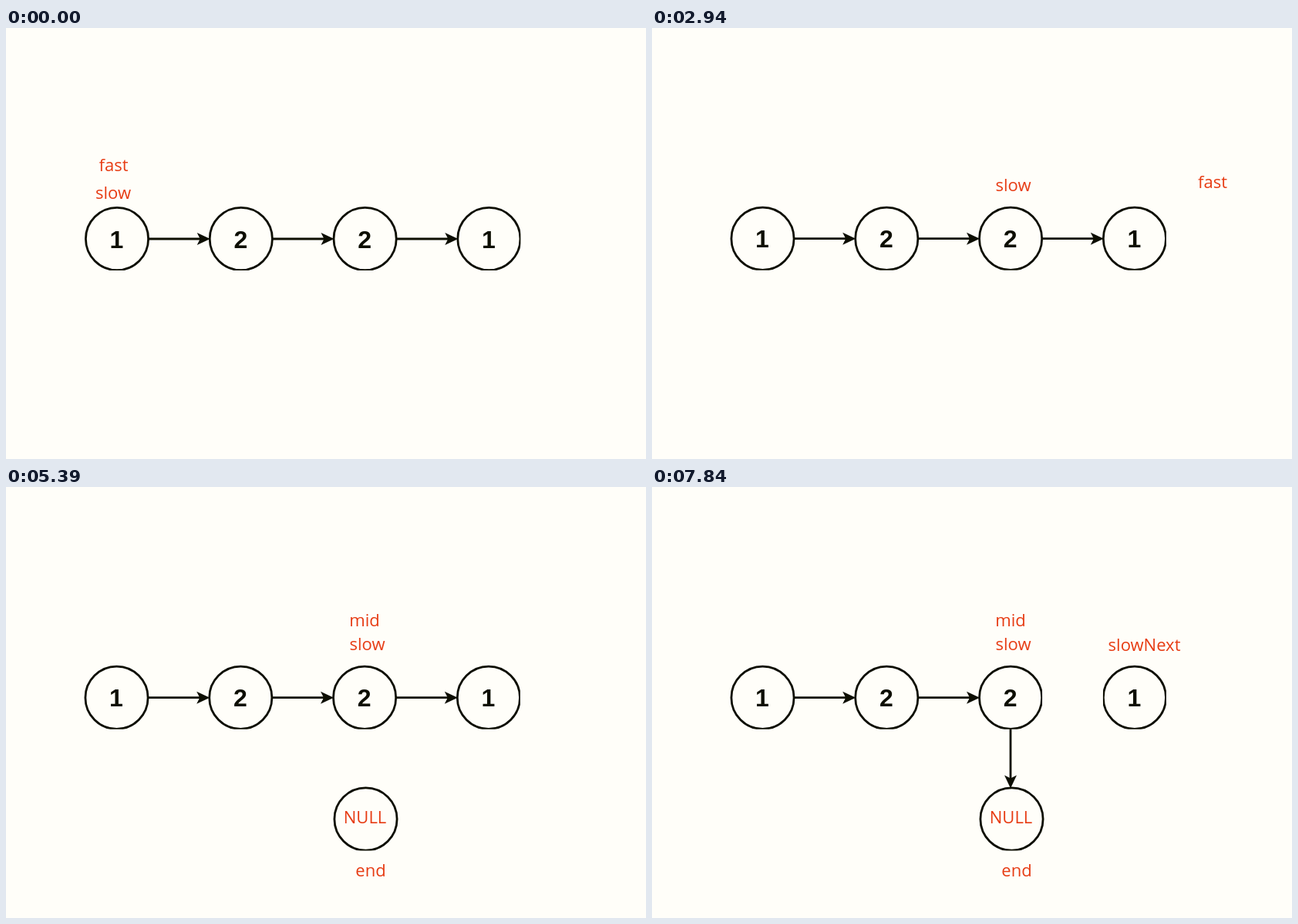
Write an HTML page with a canvas that moves like this. It is 830 px wide and 560 px high and loops after 8000 ms.

```html
<!DOCTYPE html>
<html lang="en">
<head>
<meta charset="utf-8">
<title>Middle of a linked list</title>
<style>
  html, body { margin: 0; width: 100%; height: 100%; overflow: hidden; background: #fffef9; }
  canvas { display: block; }
</style>
</head>
<body>
<canvas id="stage" width="830" height="560"></canvas>
<script>
const ctx = document.getElementById('stage').getContext('2d');
const INK = '#0d0e02', RED = '#e73c14', PAPER = '#fffef9';
const LOOP = 8000, RADIUS = 40.6, GAP = 160.8;

const midLabels = [['mid', 465, 181], ['slow', 468.5, 211.5], ['NULL', 465.5, 437], ['end', 473, 506]];

// Each scene holds until the next one starts; labels are [text, centre x, baseline].
const scenes = [
  { start: 0, x: 144, y: 274, labels: [['fast', 139.5, 185.5], ['slow', 139, 221.5]] },
  { start: 690, x: 143.5, y: 275, labels: [['slow', 302.5, 209], ['fast', 466, 210]] },
  { start: 2940, x: 143.5, y: 273.7, labels: [['slow', 468.5, 211.5], ['fast', 727, 207.5]] },
  { start: 5270, x: 143.5, y: 273.7, end: true, labels: midLabels },
  { start: 7710, x: 143.5, y: 273.7, end: true, cut: true,
    labels: [...midLabels, ['slowNext', 638.5, 213]] }
];

function text(str, x, y, font, color) {
  ctx.font = font;
  ctx.fillStyle = color;
  ctx.fillText(str, x, y);
}

// Circles are trimmed slightly at the bottom, and optionally at the sides.
function node(x, y, value, left = 45, right = 45) {
  ctx.save();
  ctx.beginPath();
  ctx.rect(x - left, y - 45, left + right, 86);
  ctx.clip();
  ctx.beginPath();
  ctx.arc(x, y, RADIUS, 0, Math.PI * 2);
  ctx.stroke();
  ctx.restore();
  if (value) text(value, x - 0.5, y + 11.5, 'bold 32px "Liberation Sans", Arial, sans-serif', INK);
}

function arrow(x, y, length, angle = 0) {
  ctx.save();
  ctx.translate(x, y);
  ctx.rotate(angle);
  ctx.beginPath();
  ctx.moveTo(0, 0);
  ctx.lineTo(length - 12, 0);
  ctx.stroke();
  ctx.beginPath();
  ctx.moveTo(length, 0);
  ctx.lineTo(length - 17, 8);
  ctx.lineTo(length - 13, 0);
  ctx.lineTo(length - 17, -8);
  ctx.fillStyle = INK;
  ctx.fill();
  ctx.restore();
}

function draw(time) {
  const t = time % LOOP;
  const { x, y, end, cut, labels } = scenes.findLast(s => s.start <= t);
  ctx.fillStyle = PAPER;
  ctx.fillRect(0, 0, 830, 560);
  ctx.strokeStyle = INK;
  ctx.lineWidth = 2.8;
  ctx.textAlign = 'center';

  ['1', '2', '2', '1'].forEach((value, i) => {
    const cx = x + i * GAP;
    const detached = cut && i === 3;
    node(cx, y, value, detached ? 41 : 45, i === 3 || (cut && i === 2) ? 41 : 45);
    if (i < (cut ? 2 : 3)) arrow(cx + RADIUS, y, GAP - 2 * RADIUS + 0.5);
  });
  if (end) node(466.5, 431.5);
  if (cut) arrow(465, y + RADIUS, 391.5 - y - RADIUS, Math.PI / 2);
  for (const [str, lx, ly] of labels) text(str, lx, ly, '22px "Open Sans", "Noto Sans", sans-serif', RED);
}

const origin = performance.now();
function tick() {
  draw(performance.now() - origin);
  requestAnimationFrame(tick);
}
tick();
</script>
</body>
</html>
```
